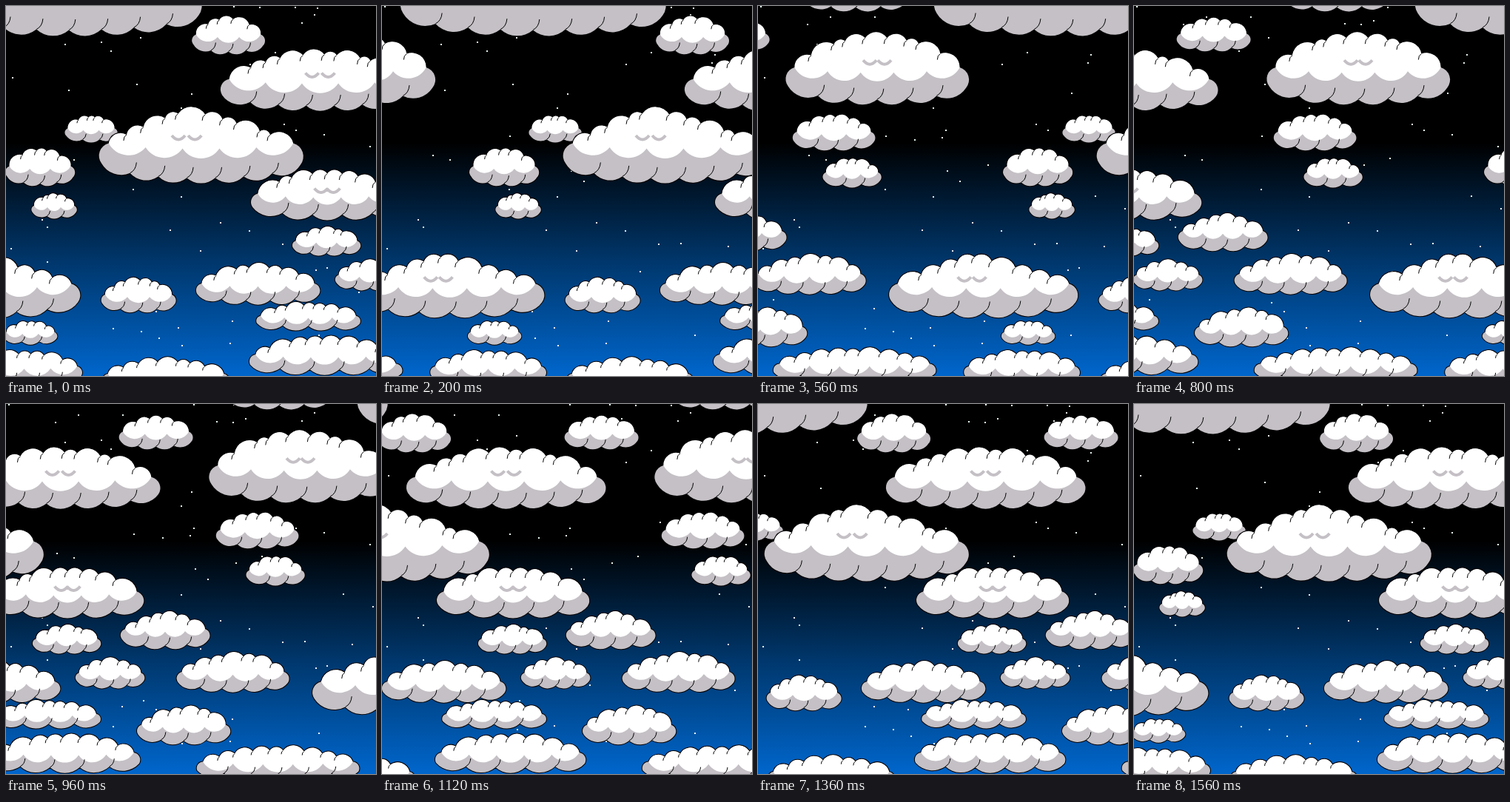
Write an HTML page with a canvas that moves like this. It is 500 by 500 pixels and loops after 1600 ms.

```html
<!DOCTYPE html>
<html lang="en">
<head>
<meta charset="utf-8">
<title>Drifting clouds</title>
<style>
html, body { margin: 0; width: 100%; height: 100%; overflow: hidden; background: #000; }
canvas { display: block; }
</style>
</head>
<body>
<canvas id="stage" width="500" height="500"></canvas>
<script>
const ctx = document.getElementById('stage').getContext('2d');
const SPAN = 920, STEPS = 39;
const SHADE = '#c4c0c5';

let seed = 11;
const random = () => (seed = seed * 16807 % 2147483647) / 2147483647;

// Joins the points with clockwise arcs; a smaller k gives rounder bumps
const arcs = (points, k) => points.slice(1).map(([x, y], i) => {
  const r = k * Math.hypot(x - points[i][0], y - points[i][1]);
  return `A${r} ${r} 0 0 1 ${x} ${y}`;
}).join('');

// Evenly spaced points between two ends, bending to the given depth
function sag([x0, y0], [x1, y1], count, depth) {
  return Array.from({ length: count + 1 }, (_, i) => {
    const t = i / count, line = y0 + (y1 - y0) * t;
    return [x0 + (x1 - x0) * t, line + (depth - line) * Math.sqrt(Math.max(0, Math.sin(Math.PI * t)))];
  });
}

// Valleys along the top: highest at the peak, falling off by the given power
function ridge(w, h, peak, power) {
  const count = 3 + Math.round(w / 40), top = 0.25 * w / count;
  return Array.from({ length: count + 1 }, (_, i) => {
    const inside = i > 0 && i < count;
    const t = (i + (inside ? 0.5 * (random() - 0.5) : 0)) / count;
    const away = Math.abs(t - peak) / (t < peak ? peak : 1 - peak);
    return [w * (0.05 + 0.9 * t), top + (0.48 * h - top) * away ** power];
  });
}

function makeCloud([x, y, w, h, peak = 0.5, power = 2.3]) {
  const crown = ridge(w, h, peak, power), end = crown[crown.length - 1];
  const left = [0.015 * w, 0.74 * h], right = [0.985 * w, 0.76 * h];
  const lobes = 2 + Math.round(w / 60);
  const base = sag(right, left, lobes, h - 0.19 * w / lobes);
  const lower = sag(end, crown[0], 2 + Math.round(w / 80), 0.55 * h);
  const c = Math.min(8, h * 0.11);
  const creases = crown.slice(1, -1).map(p => `M${p}q${-c / 2} ${c / 4} ${-c / 2} ${c}`)
    .concat(base.slice(1, -1).map(p => `M${p}q${c} ${-c / 2} ${c * 1.1} ${-c * 1.8}`));
  const curls = [-0.04, 0.04].map(d => `M${(peak + d) * w - 9} ${0.38 * h}q9 11 18 0`);
  return {
    x, y, w,
    body: new Path2D(`M${left}${arcs([left, ...crown, right], 0.6)}${arcs(base, 0.75)}Z`),
    white: new Path2D(`M${crown[0]}${arcs(crown, 0.6)}${arcs(lower, 0.6)}Z`),
    creases: new Path2D(creases.join('')),
    curls: new Path2D(h > 65 ? curls.join('') : '')
  };
}

// left, top, width, height, then peak and slope where they are not the usual ones
const clouds = [
  [-96, -79, 362, 120], [-269, -42, 138, 50],
  [252, 13, 97, 53], [-416, 15, 99, 47],
  [-295, 36, 248, 98], [288, 59, 273, 83],
  [80, 147, 70, 38], [-285, 146, 111, 50],
  [125, 135, 277, 105, 0.43, 1.2], [0, 191, 92, 53], [-244, 205, 78, 41],
  [330, 220, 208, 70], [35, 253, 60, 35],
  [-414, 278, 120, 54, 0.55, 1.3], [387, 298, 92, 40],
  [-156, 332, 257, 90, 0.44, 1.1], [-339, 336, 153, 54, 0.6],
  [445, 343, 93, 42], [256, 348, 169, 56], [129, 367, 100, 48],
  [337, 400, 143, 39], [-392, 408, 126, 53, 0.6], [-3, 425, 72, 33],
  [327, 445, 207, 54], [-314, 462, 225, 45], [-55, 465, 159, 46], [129, 475, 174, 46]
].map(makeCloud);

const stars = Array.from({ length: 75 }, () => [Math.floor(500 * random()), Math.floor(460 * random() ** 1.4)]);

const sky = ctx.createLinearGradient(0, 185, 0, 500);
sky.addColorStop(0, '#000');
sky.addColorStop(0.52, '#00386e');
sky.addColorStop(1, '#0066cc');

function drawCloud({ x, y, w, body, white, creases, curls }, shift) {
  const left = (x + shift + SPAN + 400) % SPAN - 400;
  if (left > 505 || left + w < -5) return;
  ctx.save();
  ctx.translate(left, y);
  ctx.lineWidth = 2;
  ctx.strokeStyle = '#000';
  ctx.stroke(body);
  ctx.fillStyle = SHADE;
  ctx.fill(body);
  ctx.clip(body);
  ctx.fillStyle = '#fff';
  ctx.fill(white);
  ctx.lineWidth = 1;
  ctx.stroke(creases);
  ctx.strokeStyle = SHADE;
  ctx.lineWidth = 4;
  ctx.stroke(curls);
  ctx.restore();
}

function draw() {
  const step = Math.floor(performance.now() % 1600 / 40);
  const shift = Math.round(Math.min(23.7 * step, SPAN - 23.36 * (STEPS - step)));
  ctx.fillStyle = sky;
  ctx.fillRect(0, 0, 500, 500);
  ctx.fillStyle = '#e8f4f0';
  for (const [x, y] of stars) ctx.fillRect(x, y, 2, 2);
  for (const cloud of clouds) drawCloud(cloud, shift);
  requestAnimationFrame(draw);
}
draw();
</script>
</body>
</html>
```
